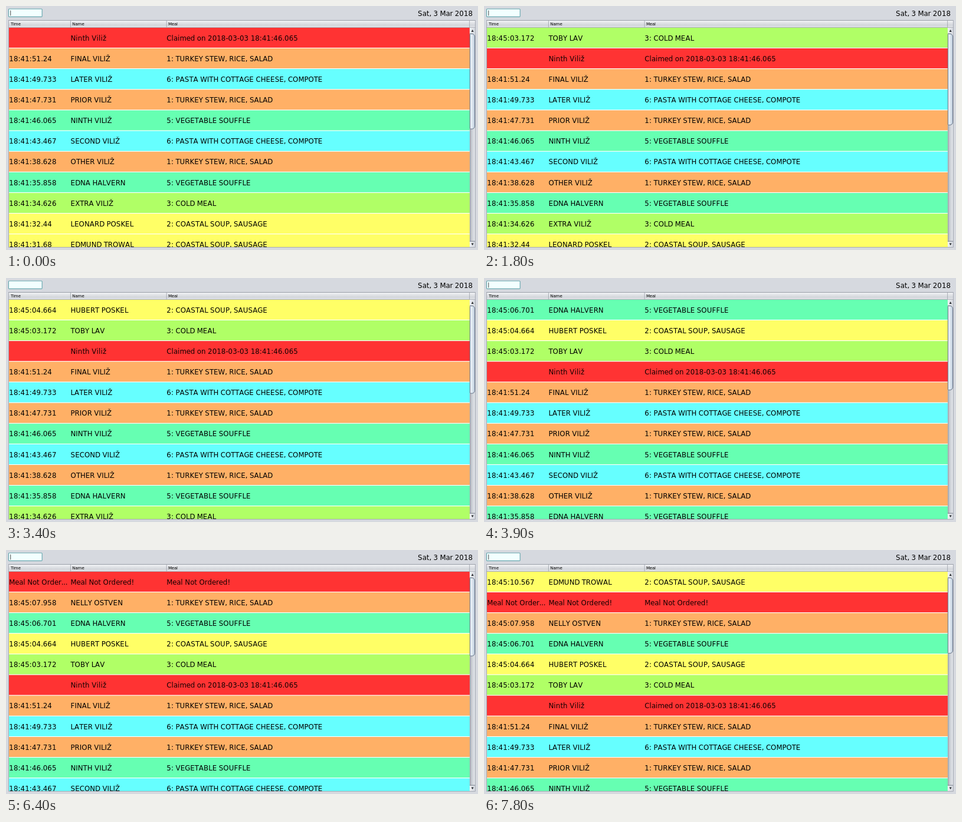
These frames come from a looping animation (800x415 px, 8 s). An HTML page with a canvas:

```html
<!DOCTYPE html>
<html lang="en">
<head>
<meta charset="utf-8">
<title>Meal claims</title>
<style>
html, body { margin: 0; width: 100%; height: 100%; overflow: hidden; background: #d6d9df; }
canvas { display: block; }
</style>
</head>
<body>
<canvas id="stage" width="800" height="415"></canvas>
<script>
const ctx = document.getElementById('stage').getContext('2d');
const LOOP = 8000;
const SCALE = 800 / 1366; // the window is laid out 1366 units wide
const COLS = [9, 187, 465];
const TABLE = { left: 8.5, right: 1342, top: 63, bottom: 700, row: 60, gap: 2 };
const RED = '#ff3333';

const MEALS = {
  1: ['TURKEY STEW, RICE, SALAD', '#ffb066'],
  2: ['COASTAL SOUP, SAUSAGE', '#ffff66'],
  3: ['COLD MEAL', '#b0ff66'],
  5: ['VEGETABLE SOUFFLE', '#66ffb2'],
  6: ['PASTA WITH COTTAGE CHEESE, COMPOTE', '#66ffff']
};

const meal = (time, name, id) =>
  ({ cells: [time, name, id + ': ' + MEALS[id][0]], fill: MEALS[id][1], ink: '#000' });
const alertRow = (...cells) => ({ cells, fill: RED, ink: '#140000' });

// Newest first
const ROWS = [
  meal('18:45:10.567', 'EDMUND TROWAL', 2),
  alertRow('Meal Not Order...', 'Meal Not Ordered!', 'Meal Not Ordered!'),
  meal('18:45:07.958', 'NELLY OSTVEN', 1),
  meal('18:45:06.701', 'EDNA HALVERN', 5),
  meal('18:45:04.664', 'HUBERT POSKEL', 2),
  meal('18:45:03.172', 'TOBY LAV', 3),
  alertRow('', 'Ninth Viliž', 'Claimed on 2018-03-03 18:41:46.065'),
  meal('18:41:51.24', 'FINAL VILIŽ', 1),
  meal('18:41:49.733', 'LATER VILIŽ', 6),
  meal('18:41:47.731', 'PRIOR VILIŽ', 1),
  meal('18:41:46.065', 'NINTH VILIŽ', 5),
  meal('18:41:43.467', 'SECOND VILIŽ', 6),
  meal('18:41:38.628', 'OTHER VILIŽ', 1),
  meal('18:41:35.858', 'EDNA HALVERN', 5),
  meal('18:41:34.626', 'EXTRA VILIŽ', 3),
  meal('18:41:32.44', 'LEONARD POSKEL', 2),
  meal('18:41:31.68', 'EDMUND TROWAL', 2)
];

const CLAIMS = [400, 1900, 3900, 5100, 6400, 7800];
const CARET_OFF = [[1000, 1500], [2400, 2900], [3400, 3700], [4500, 4900], [5700, 6200], [7000, 7500]];

function rect(x, y, w, h, fill) {
  ctx.fillStyle = fill;
  ctx.fillRect(x, y, w, h);
}

function rounded(x, y, w, h, r, fill, stroke, line) {
  ctx.beginPath();
  ctx.roundRect(x, y, w, h, r);
  ctx.fillStyle = fill;
  ctx.fill();
  ctx.strokeStyle = stroke;
  ctx.lineWidth = line;
  ctx.stroke();
}

function gradient(x0, y0, x1, y1, ...colors) {
  const g = ctx.createLinearGradient(x0, y0, x1, y1);
  colors.forEach((c, i) => g.addColorStop(i / (colors.length - 1), c));
  return g;
}

// Whole-unit glyph advances, as in a hinted desktop interface
function text(str, x, y, size, color) {
  ctx.font = size + 'px "DejaVu Sans", sans-serif';
  ctx.fillStyle = color;
  for (const ch of str) {
    ctx.fillText(ch, x, y);
    x += Math.round(ctx.measureText(ch).width);
  }
}

function triangle(x, y, dir) {
  ctx.beginPath();
  ctx.moveTo(x - 3.5, y + 3 * dir);
  ctx.lineTo(x + 3.5, y + 3 * dir);
  ctx.lineTo(x, y - 3.5 * dir);
  ctx.fillStyle = '#2b2e33';
  ctx.fill();
}

function drawTop(caret) {
  rounded(7.5, 8.5, 97, 23, 2, '#f2ffff', '#68a6ae', 2);
  if (caret) rect(12.5, 13, 1.5, 15, '#333');
  text('Sat, 3 Mar 2018', 1192, 28.5, 20, '#000');
}

function drawHeader() {
  rect(7, 41, 1351, 22, gradient(0, 41, 0, 63, '#f6f7f9', '#e3e5e9', '#d3d6db', '#e6e8ec'));
  rect(7, 41, 1351, 1.2, '#9297a1');
  rect(7, 61.6, 1351, 1.4, '#9ba0a9');
  for (const x of [COLS[1], COLS[2], TABLE.right]) rect(x - 1, 42, 1.2, 20, '#9297a1');
  ['Time', 'Name', 'Meal'].forEach((s, i) => text(s, COLS[i] + 4.5, 56, 12, '#000'));
}

function drawRows(first) {
  const t = TABLE;
  ctx.save();
  ctx.beginPath();
  ctx.rect(t.left, t.top, t.right - t.left, t.bottom - t.top);
  ctx.clip();
  rect(t.left, t.top, t.right - t.left, t.bottom - t.top, '#fff');
  ROWS.slice(first, first + 11).forEach((row, i) => {
    const y = t.top + i * t.row;
    rect(t.left, y, t.right - t.left, t.row - t.gap, row.fill);
    row.cells.forEach((s, c) => text(s, COLS[c], y + 37, 20, row.ink));
  });
  ctx.restore();
}

function drawScrollbar(total) {
  const x = TABLE.right, w = 15.5, top = 81, track = 598;
  const visible = (TABLE.bottom - TABLE.top) / TABLE.row;
  rect(x, TABLE.top, w, TABLE.bottom - TABLE.top, gradient(x, 0, x + w, 0, '#9a9fa9', '#c6cad1', '#d6d9df', '#e2e5ea'));
  const button = gradient(x, 0, x + w, 0, '#f1f3f5', '#d4d8df');
  rect(x, TABLE.top, w, 16, button);
  rect(x, 684, w, 16, button);
  rect(x, 682.5, w, 1.5, '#6f7682');
  triangle(x + 8, 72, 1);
  triangle(x + 8, 692, -1);
  const face = gradient(x, 0, x + w, 0, '#f2f6fa', '#dbe5ef', '#b9c8d8');
  rounded(x + 0.8, top, w - 1.6, track * visible / total, [2, 8, 8, 2], face, '#56657a', 1.5);
}

function draw(now) {
  const t = now % LOOP;
  const added = CLAIMS.filter(at => t >= at).length;
  const caret = !CARET_OFF.some(([a, b]) => t >= a && t < b);
  ctx.setTransform(SCALE, 0, 0, SCALE, 0, 0);
  rect(0, 0, 1366, 710, '#d6d9df');
  drawTop(caret);
  drawHeader();
  drawRows(CLAIMS.length - added);
  drawScrollbar(23 + added);
  ctx.strokeStyle = '#9297a1';
  ctx.lineWidth = 1.2;
  ctx.strokeRect(7.9, 41.5, 1350.1, 659);
}

const start = performance.now();
function tick() {
  draw(performance.now() - start);
  requestAnimationFrame(tick);
}
tick();
</script>
</body>
</html>
```
